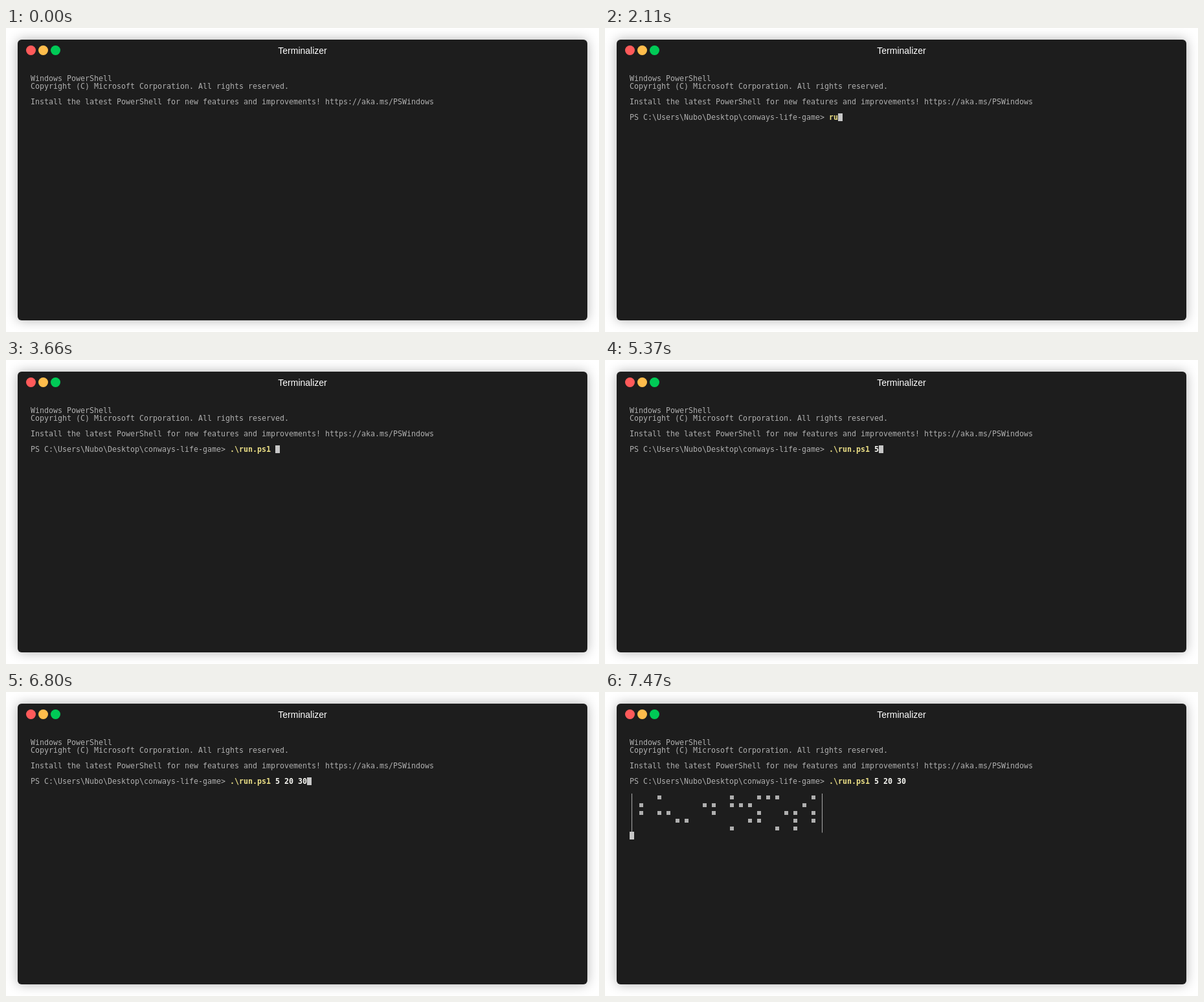
Animation, 916 px wide and 470 px high, one loop 8000 ms. Source, as an HTML page with a canvas:

```html
<!DOCTYPE html>
<html lang="en">
<head>
<meta charset="utf-8">
<title>Terminal</title>
<style>
  html, body { margin: 0; width: 100%; height: 100%; overflow: hidden; background: #fff; }
  canvas { display: block; }
</style>
</head>
<body>
<canvas id="stage" width="916" height="470"></canvas>
<script>
const ctx = document.getElementById('stage').getContext('2d');

const LOOP = 8000;
const CELL_W = 7, CELL_H = 12, LEFT = 38, TOP = 72;
const COLORS = { text: '#afafaf', command: '#ebdf86', args: '#f9f9f4', cursor: '#c7c7c7' };
const MONO = '11.63px "DejaVu Sans Mono", monospace';

const BANNER = [
  'Windows PowerShell',
  'Copyright (C) Microsoft Corporation. All rights reserved.',
  '',
  'Install the latest PowerShell for new features and improvements! https://aka.ms/PSWindows'
];
const PROMPT = String.raw`PS C:\Users\Nubo\Desktop\conways-life-game> `;
const SCRIPT = String.raw`.\run.ps1`;
const PROMPT_ROW = 5, BOARD_ROW = 7;

// Time at which each state of the input line appears: [ms, command, arguments]
const TYPING = [
  [110, '', ''],
  [2110, 'ru', ''],
  [2270, 'run', ''],
  [2610, 'run.', ''],
  [2930, SCRIPT, ''],
  [3660, SCRIPT, ' '],
  [5370, SCRIPT, ' 5'],
  [5510, SCRIPT, ' 5 '],
  [6190, SCRIPT, ' 5 2'],
  [6300, SCRIPT, ' 5 20'],
  [6450, SCRIPT, ' 5 20 '],
  [6700, SCRIPT, ' 5 20 3'],
  [6800, SCRIPT, ' 5 20 30']
];
const ENTER_AT = 7450, BOARD_AT = 7470;

const BOARD = [
  '..#.......#..###...#',
  '#......##.###.....#.',
  '#.##....#....#..##.#',
  '....##......##...#.#',
  '..........#....#.#..'
];

const cellX = col => LEFT + col * CELL_W;
const cellY = row => TOP + row * CELL_H;

function write(text, col, row, color = COLORS.text, bold = false) {
  ctx.font = (bold ? 'bold ' : '') + MONO;
  ctx.textAlign = 'left';
  ctx.fillStyle = color;
  [...text].forEach((ch, i) => ctx.fillText(ch, cellX(col + i), cellY(row) + 10));
}

function drawCursor(col, row) {
  ctx.fillStyle = COLORS.cursor;
  ctx.fillRect(cellX(col), cellY(row), CELL_W, CELL_H);
}

function drawWindow() {
  ctx.fillStyle = '#fff';
  ctx.fillRect(0, 0, 916, 470);

  ctx.save();
  ctx.shadowColor = 'rgba(0, 0, 0, 0.3)';
  ctx.shadowBlur = 18;
  ctx.fillStyle = '#1d1d1d';
  ctx.beginPath();
  ctx.roundRect(18, 18, 880, 434, 6);
  ctx.fill();
  ctx.restore();

  ['#ff5a5a', '#ffbd4c', '#00ca56'].forEach((color, i) => {
    ctx.fillStyle = color;
    ctx.beginPath();
    ctx.arc(38.5 + i * 19, 34.5, 7.5, 0, Math.PI * 2);
    ctx.fill();
  });

  ctx.font = '14px "Liberation Sans", sans-serif';
  ctx.textAlign = 'center';
  ctx.fillStyle = '#fff';
  ctx.fillText('Terminalizer', 458, 40);
}

function drawBoard() {
  BOARD.forEach((line, y) => {
    const row = BOARD_ROW + y;
    write('|', 0, row);
    write('|', 42, row);
    [...line].forEach((cell, x) => {
      if (cell === '#') ctx.fillRect(cellX(2 + x * 2) + 1, cellY(row) + 4, 6, 6);
    });
  });
}

function draw(t) {
  drawWindow();
  BANNER.forEach((line, row) => write(line, 0, row));

  const state = TYPING.findLast(([start]) => t >= start);
  if (!state) return;
  const [, command, args] = state;
  const argsCol = PROMPT.length + command.length;
  write(PROMPT, 0, PROMPT_ROW);
  write(command, PROMPT.length, PROMPT_ROW, COLORS.command, true);
  write(args, argsCol, PROMPT_ROW, COLORS.args, true);

  if (t >= BOARD_AT) {
    drawBoard();
    drawCursor(0, BOARD_ROW + BOARD.length);
  } else if (t >= ENTER_AT) {
    drawCursor(0, PROMPT_ROW + 1);
  } else {
    drawCursor(argsCol + args.length, PROMPT_ROW);
  }
}

const start = performance.now();
function tick() {
  draw((performance.now() - start) % LOOP);
  requestAnimationFrame(tick);
}
tick();
</script>
</body>
</html>
```
